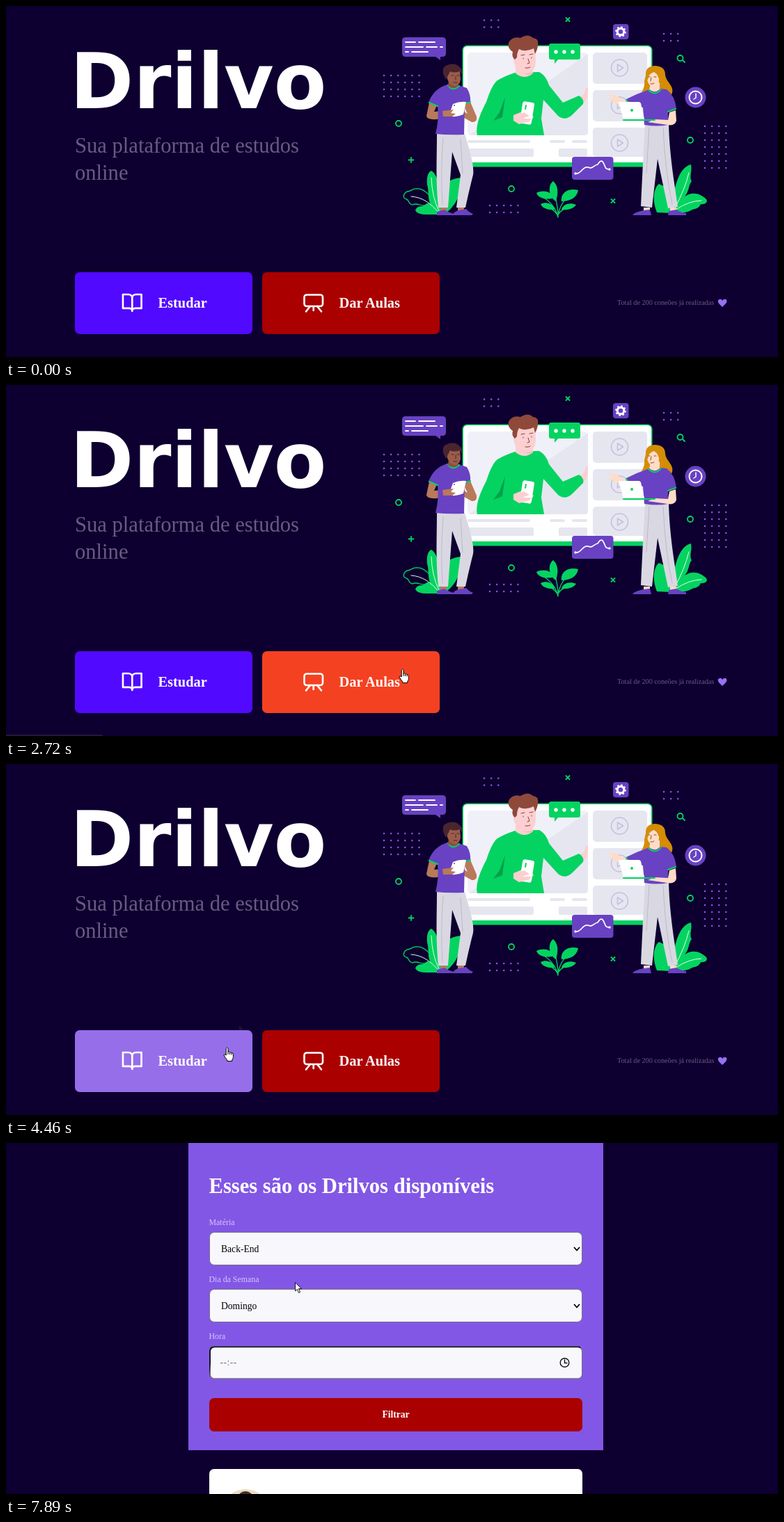
An HTML page that plays this animation: 1109x505 px, repeating every 8 s.

```html
<!DOCTYPE html>
<html lang="pt-BR">
<head>
<meta charset="utf-8">
<title>Plataforma de estudos</title>
<style>
  html, body { margin: 0; width: 100%; height: 100%; overflow: hidden; background: #0d0030; }
  svg { display: block; width: 1109px; height: 505px; }
  text { font-family: "Liberation Serif", "Times New Roman", serif; white-space: pre; }
  .bold { font-weight: 700; fill: #fff; }
  .muted { fill: #6a5a82; }
  .label { font-size: 11.9px; fill: #d6c5fb; }
  .field { font-size: 13.6px; fill: #000; }
  .green { fill: #04d361; }
  .purple { fill: #6842c2; }
  .white { fill: #fff; }
  .pale { fill: #e6e6f0; }
  .pants { fill: #d9d8e2; }
  .brown { fill: #b97a5a; }
  .skin { fill: #ffdcc8; }
  .pink { fill: #fccfd0; }
  .line { fill: none; stroke-linecap: round; stroke-linejoin: round; }
  .white-line { stroke: #fff; }
  .green-line { stroke: #04d361; }
</style>
</head>
<body>
<svg viewBox="0 0 1109 505" xmlns="http://www.w3.org/2000/svg">
  <rect width="1109" height="505" fill="#0d0030"/>

  <g id="home">
    <text x="92" y="147" fill="#fff" style="font:700 110px 'DejaVu Sans',sans-serif">Drilvo</text>
    <g class="muted" font-size="30.6">
      <text x="99" y="211">Sua plataforma de estudos</text>
      <text x="99" y="250">online</text>
    </g>

    <g id="dots" fill="#8257e5"></g>

    <!-- plants -->
    <g class="green">
      <path d="M620 299C602 283 609 270 605 257C604 247 606 239 611 237C619 242 621 254 623 266C629 255 641 247 655 247C656 265 647 290 628 300Z"/>
      <path d="M588 294C592 285 598 291 603 285C611 280 619 291 626 300L604 300Q591 300 588 294Z"/>
      <path d="M935 297C928 280 930 262 938 256L960 266C965 244 972 231 984 228C986 238 981 246 985 252C980 258 982 266 975 274C986 266 998 270 1006 278C1009 283 1003 286 998 285C995 293 988 291 984 294C976 299 965 296 956 298Z"/>
      <path d="M790 281C779 274 778 258 786 252C793 258 794 268 790 281ZM787 276C776 280 764 276 762 269C772 264 784 267 787 276ZM788 293C780 294 770 291 768 285C776 281 786 284 788 293ZM798 281C796 269 808 261 822 265C820 276 810 281 798 281ZM798 293C800 285 810 282 819 286C815 292 806 294 798 293Z"/>
    </g>
    <path class="line green-line" stroke-width="1.3" d="M622 297C615 277 602 262 590 263C584 262 582 267 576 267C571 270 569 276 575 278C580 279 577 285 584 286C592 282 597 290 605 286M793 304C794 290 788 272 786 260M793 304C790 290 782 280 766 272M793 302C795 288 802 276 816 269M793 302C789 294 780 289 772 287M793 300C798 293 804 289 814 287"/>
    <path class="line" stroke="#e3ffe9" d="M582 274C598 275 611 284 622 298M611 247Q612 275 622 295M960 292Q975 265 981 240M962 293Q982 280 999 280"/>

    <!-- screen -->
    <rect class="green" x="655.5" y="56.5" width="273" height="175" rx="7"/>
    <path class="white" d="M663 58H921Q927 58 927 64V225H657V64Q657 58 663 58Z"/>
    <rect x="663" y="67" width="173" height="119" rx="5" fill="#f0f0f8"/>
    <path class="pale" d="M836 69V181Q836 186 831 186H665Z"/>
    <g id="videos"></g>
    <g class="pale">
      <rect x="663" y="193" width="90" height="4" rx="2"/>
      <rect x="781" y="193" width="22" height="4" rx="2"/>
      <rect x="813" y="193" width="22" height="4" rx="2"/>
      <rect x="663" y="205" width="95" height="12" rx="2"/>
      <rect x="794" y="205" width="41" height="12" rx="2"/>
    </g>

    <!-- teacher -->
    <path class="pink" d="M822 132L830 127L833 118Q837 115 836 122L835 133L828 142Z"/>
    <path class="green" d="M731 96L766 95Q776 100 780 114L800 139L823 129Q831 134 829 141L813 157Q803 166 793 158L772 135L769 162L773 186H677Q673 170 690 138Q698 113 706 107Q716 101 731 96Z"/>
    <path fill="#039f4c" d="M717 131L709 153L700 165L713 160Z"/>
    <path class="pink" d="M732 82H757V97Q745 107 732 97Z"/>
    <path fill="#f3b9bd" d="M738 92Q746 100 756 95V98Q747 101 738 92Z"/>
    <path class="pink" d="M729 62V78Q732 96 748 97Q760 95 761 80L760 56H734Z"/>
    <path fill="#8f493b" d="M731 77Q726 73 728 66Q720 61 722 53Q727 43 739 46Q750 39 757 46Q766 47 764 56Q764 62 760 69L758 61Q746 67 737 62Q734 67 734 74Z"/>
    <path class="line" stroke="#81413b" d="M740 71l5-1m7 0l5-1M750 76l2 6-3 1M746 89q5 1 7-1M743 75v1M755 74v1"/>
    <path class="pink" d="M729 157L744 151L758 159L754 166L737 170L729 165Z"/>
    <rect class="white" x="740" y="138" width="17" height="32" rx="3" transform="rotate(9 749 154)"/>
    <path class="line green-line" stroke-width="2" d="M747 143l-1 5"/>
    <path class="pink" d="M730 158L744 153L752 158L742 162L755 162L751 167L736 169Z"/>

    <!-- callouts -->
    <path class="green" d="M783 54H822Q825 54 825 57V74Q825 77 822 77H793L788 83V77H783Q780 77 780 74V57Q780 54 783 54Z"/>
    <g class="white"><circle cx="790" cy="66" r="2.7"/><circle cx="802" cy="66" r="2.7"/><circle cx="814" cy="66" r="2.7"/></g>
    <path class="purple" d="M574 45H627Q632 45 632 50V68Q632 73 627 73H624V78L617 73H574Q569 73 569 68V50Q569 45 574 45Z"/>
    <path class="line white-line" stroke-width="1.8" d="M574 52H588M593 52H616M574 59H599M604 59H619M624 59H627M574 66H578M583 66H606"/>
    <rect class="purple" x="813" y="217" width="59.5" height="33" rx="4"/>
    <path class="line white-line" stroke-width="1.7" d="M818 241C826 243 828 230 836 232C843 235 844 229 850 228C856 218 858 225 861 232Q862 235 867 235"/>
    <g class="white"><circle cx="818" cy="241" r="1.7"/><circle cx="867" cy="235" r="1.7"/></g>
    <circle class="purple" cx="990.5" cy="131.5" r="15"/>
    <circle class="line white-line" stroke-width="2" cx="990.5" cy="131.5" r="9"/>
    <path class="line white-line" stroke-width="1.5" d="M991 126V132L988 134"/>
    <rect class="purple" x="872" y="26" width="22.5" height="22" rx="4"/>
    <circle class="line white-line" stroke-width="3" cx="883" cy="37" r="4.8"/>
    <circle class="line white-line" stroke-width="2" stroke-dasharray="2.5 2.84" style="stroke-linecap:butt" cx="883" cy="37" r="6.8"/>
    <g class="line green-line" stroke-width="1.8">
      <circle cx="564" cy="169" r="4"/><circle cx="726" cy="263" r="4"/><circle cx="983" cy="193" r="4"/>
      <circle cx="968.5" cy="75" r="4"/>
      <path d="M972 78l3 3M582 218v7M578.5 221.5h7M804.5 17l5 5m0-5l-5 5M869.5 278l5 5m0-5l-5 5"/>
    </g>

    <!-- student with tablet -->
    <path class="brown" d="M624 286h9v9h-9zM649 286h9v9h-9z"/>
    <path class="pants" d="M619 184H659C666 208 673 230 671 243Q665 266 660 290H647L653 243L641 210L635 290H621C617 252 619 218 619 184Z"/>
    <path class="line" stroke="#bcbac9" d="M628 190Q624 240 627 285M653 192L656 241"/>
    <path class="purple" d="M619 301V296L630 293Q635 297 644 299V301ZM642 301Q643 296 650 294L661 292Q665 297 671 299L669 301Z"/>
    <path class="brown" d="M608 139L619 143L615 152L640 150L642 158L619 163Q604 164 604 158ZM656 141L667 138L676 159Q677 168 669 167L651 157L657 151L663 155Z"/>
    <path class="purple" d="M634 113L650 114L662 118Q668 128 667 138L659 142L658 185Q635 186 617 184Q622 165 620 144L607 139Q614 119 634 113Z"/>
    <path class="line green-line" stroke-width="2.2" d="M608 139L620 144M658 141L667 138M635 114Q641 124 651 115"/>
    <path fill="#8c4f40" d="M636 106H649V116Q642 121 635 115Z"/>
    <path fill="#9b5d49" d="M635 92L652 94L653 106Q651 116 644 115Q635 113 633 101Z"/>
    <path fill="#4a2530" d="M632 106Q625 94 629 88Q636 82 646 84Q656 88 655 98L652 94Q643 97 638 94Z"/>
    <path class="line" stroke="#4a2530" d="M640 100h3m5 0h3M646 101v5M643 110h5"/>
    <path class="white" d="M642 141Q651 137 661 138L657 156Q646 161 636 158Z"/>
    <path class="brown" d="M627 151L643 149L639 154L646 155L641 159L628 159Z"/>
    <circle cx="644" cy="143" r="1" class="purple"/>

    <!-- student with laptop -->
    <path class="pants" d="M918 170H952C953 214 960 254 965 289L951 291L936 220L928 290L912 288Q915 223 918 170Z"/>
    <path class="line" stroke="#bcbac9" d="M924 175L920 240M944 175Q947 240 957 285"/>
    <path class="skin" d="M916 290h9v5h-9zM954 290h9v5h-9z"/>
    <path class="purple" d="M900 301Q902 297 916 294L925 293L927 301ZM951 301L952 295L963 293Q969 297 977 298V301Z"/>
    <path fill="#d48d05" d="M919 100Q918 86 933 86Q947 87 947 99C948 109 960 115 957 125Q954 134 942 132Q932 130 928 121L913 124Q918 116 917 108Z"/>
    <path class="skin" d="M926 110H939V122Q931 128 924 121ZM922 97Q932 91 938 96V108Q936 117 928 116Q919 112 922 97Z"/>
    <path fill="#d48d05" d="M919 106Q918 92 931 89Q944 91 943 108L939 111Q938 99 931 95Q923 97 922 106Z"/>
    <path class="line" stroke="#894c22" d="M923 102h2m6 0h3M927 103l-1 5M926 112q3 1 5-1"/>
    <path class="skin" d="M906 131L888 136L875 128L864 128L873 132L865 134L880 142L901 144Z"/>
    <path class="purple" d="M924 120Q932 127 940 119L949 120Q961 129 963 148L951 152V171Q936 174 917 171L915 146L897 142L891 134Q907 126 924 120Z"/>
    <path class="line green-line" stroke-width="2" d="M891 135L895 143M951 152L962 148M923 121Q933 130 941 120"/>
    <path class="white" d="M880 138H909Q911 138 912 140L917 163H887Z"/>
    <circle class="green" cx="899" cy="150" r="2"/>
    <path class="skin" d="M953 153L962 150L963 165Q961 173 950 171L922 167L932 163L951 164Z"/>
    <path class="line green-line" stroke-width="2" d="M887 164H932"/>

    <!-- actions -->
    <rect id="study" x="99" y="383" width="255" height="89" rx="6.8"/>
    <rect id="teach" x="368" y="383" width="255" height="89" rx="6.8"/>
    <g class="line white-line" stroke-width="2" transform="translate(165.3 411) scale(1.33)">
      <path d="M2 3h6a4 4 0 0 1 4 4v14a3 3 0 0 0-3-3H2zM22 3h-6a4 4 0 0 0-4 4v14a3 3 0 0 1 3-3h7z"/>
    </g>
    <g class="line white-line" stroke-width="2.6">
      <rect x="428.5" y="415.5" width="26.5" height="16.5" rx="3.5"/>
      <path d="M437 432l-6 7.5M447 432l6 7.5M441.7 433v5"/>
    </g>
    <text class="bold" x="218.5" y="434" font-size="20.4">Estudar</text>
    <text class="bold" x="478.5" y="434" font-size="20.4">Dar Aulas</text>
    <text class="muted" x="878" y="430" font-size="10.2">Total de 200 coneões já realizadas</text>
    <path fill="#9871f5" d="M1029 433L1024 428Q1021 423 1025 422Q1028 421 1029 424Q1031 421 1034 422Q1037 424 1034 428Z"/>
    <path id="trail" fill="#1c1435" d="M335 376V383H342Z"/>
  </g>

  <g id="search">
    <rect x="262" width="596" height="442" fill="#8257e5"/>
    <text class="bold" x="291.5" y="72" font-size="30.6">Esses são os Drilvos disponíveis</text>
    <g id="selects"></g>
    <text class="label" x="291.5" y="282">Hora</text>
    <rect x="292" y="292.5" width="536" height="47" rx="7" fill="#767676"/>
    <path fill="#17171c" d="M292 337V299.5Q292 292.5 299 292.5H824L826 295H296Z"/>
    <rect x="294" y="294.3" width="533" height="44" rx="5.5" fill="#f8f8fc"/>
    <text class="field" x="307.5" y="320" style="fill:#757575" letter-spacing=".5">--:--</text>
    <g class="line" stroke="#111" stroke-width="1.4"><circle cx="802.5" cy="316" r="6.3"/><path d="M802.5 312V316.5H806"/></g>
    <rect id="filter" x="292" y="367" width="536" height="48" rx="6.8"/>
    <text class="bold" x="560" y="395" font-size="13.6" text-anchor="middle">Filtrar</text>
    <rect class="white" x="292" y="469" width="536" height="60" rx="6.8"/>
    <circle cx="344" cy="532" r="34" fill="#f1dac4"/>
    <ellipse cx="344" cy="511" rx="11" ry="10" fill="#3d3030"/>
  </g>

  <path id="status"/>
  <path id="arrow" fill="#fff" stroke="#000" stroke-width=".9" d="M.5 .8V13L3.3 10.4L5.5 15.5L7.6 14.6L5.4 9.7H9.5Z"/>
  <g id="hand" stroke="#000" stroke-linejoin="round">
    <path fill="#fff" d="M4.2 12V2.2Q5.5-.4 7 2.2V7.2Q8.5 6.2 9.5 7.9Q11 7 12 8.7Q14.4 8.2 14.4 10.5V14.5Q14.2 17 12.8 18.2V20.5H5.6V18.6Q3.5 16.5 1 12Q1.5 9.5 4.2 12Z"/>
    <path fill="none" d="M7 7V11M9.5 8V11M12 9V11.5"/>
  </g>
</svg>

<script>
const $ = id => document.getElementById(id);
const LOOP = 8000;

// Repeated artwork
const dotGrids = [[543, 100, 6, 4], [687, 20.5, 3, 2], [945, 40, 3, 2], [1004, 173, 4, 7], [695, 287, 5, 2]];
$('dots').innerHTML = dotGrids.map(([x, y, cols, rows]) =>
  Array.from({ length: cols * rows }, (_, i) =>
    `<circle cx="${x + i % cols * 10.1}" cy="${y + Math.floor(i / cols) * 10}" r="1.3"/>`).join('')).join('');

$('videos').innerHTML = [67, 121, 175].map(y => `
  <rect class="pale" x="843" y="${y}" width="78" height="${y > 170 ? 42 : 45}" rx="5"/>
  <g class="line" stroke="#c5c0df" stroke-width="1.6">
    <circle cx="881.5" cy="${y + 22}" r="12"/><path d="M878.5 ${y + 17}v10l8-5z"/>
  </g>`).join('');

$('selects').innerHTML = [[129, 'Matéria', 'Back-End'], [211, 'Dia da Semana', 'Domingo']].map(([y, label, value]) => `
  <text class="label" x="291.5" y="${y - 11}">${label}</text>
  <rect x="292.5" y="${y - .5}" width="535" height="47" rx="6.8" fill="#f8f8fc" stroke="#767083"/>
  <text class="field" x="309" y="${y + 28}">${value}</text>
  <path class="line" stroke="#000" stroke-width="1.8" d="M816.5 ${y + 21.5}l3.5 4 3.5-4"/>`).join('');

// Each step holds until the next one and keeps any value it does not set.
const steps = [
  { at: 0, page: 'home', study: '#5109ff', teach: '#ab0000', filter: '#ab0000', bar: 0, shade: '#3a393f', trail: 0 },
  { at: 330, arrow: [902, 463] },
  { at: 650, arrow: [786, 430] },
  { at: 1000, arrow: [771, 407] },
  { at: 1340, arrow: [708, 371] },
  { at: 1690, arrow: [629, 355] },
  { at: 2050, arrow: [610, 355] },
  { at: 2370, hand: [573, 391], teach: '#c81c0f' },
  { at: 2720, hand: [564, 408], teach: '#f44122', bar: 139, shade: '#211a35' },
  { at: 3070, hand: [560, 408], shade: '#3a393f' },
  { at: 3410, arrow: [494, 370] },
  { at: 3760, arrow: [443, 346], teach: '#ab0000', shade: '#211a35' },
  { at: 4110, arrow: [335, 376], bar: 0 },
  { at: 4460, hand: [312, 407], study: '#966ee9', trail: 1 },
  { at: 4810, hand: [311, 408], bar: 110, shade: '#3a393f' },
  { at: 5140, hand: [309, 410] },
  { at: 5490, hand: [307, 415] },
  { at: 6880, page: 'search', shade: '#171029' },
  { at: 7210, bar: 0 },
  { at: 7540, arrow: [281, 384], filter: '#c81c0f' },
  { at: 7890, arrow: [415, 200], filter: '#ab0000' }
];

let state = {};
const timeline = steps.map(step => {
  const pointer = step.arrow ? { hand: null } : step.hand ? { arrow: null } : {};
  return state = { ...state, ...pointer, ...step };
});

function show(id, visible) {
  $(id).style.display = visible ? '' : 'none';
}

function place(id, point) {
  show(id, point);
  if (point) $(id).setAttribute('transform', `translate(${point})`);
}

function render(time) {
  const now = timeline.findLast(step => step.at <= time);
  show('home', now.page === 'home');
  show('search', now.page === 'search');
  show('trail', now.trail);
  for (const id of ['study', 'teach', 'filter']) $(id).setAttribute('fill', now[id]);
  show('status', now.bar);
  $('status').setAttribute('d', `M0 503H${now.bar - 2}Q${now.bar} 503 ${now.bar} 505H0Z`);
  $('status').setAttribute('fill', now.shade);
  place('arrow', now.arrow);
  place('hand', now.hand);
}

const start = performance.now();
function tick() {
  render((performance.now() - start) % LOOP);
  requestAnimationFrame(tick);
}
tick();
</script>
</body>
</html>
```
